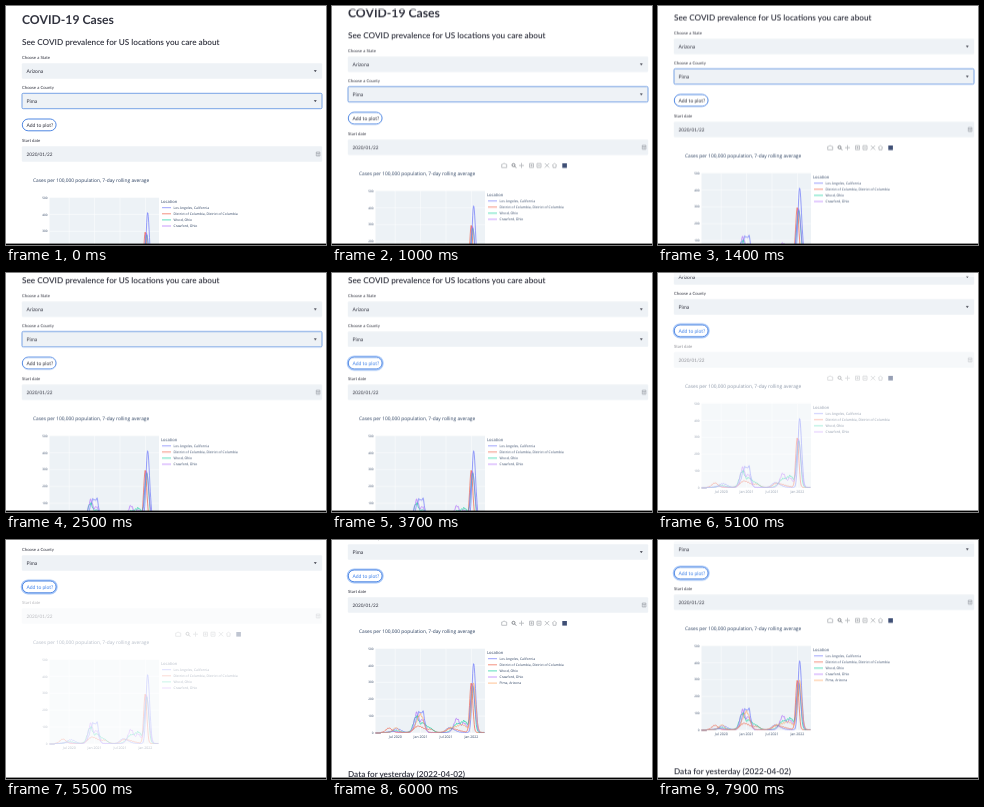
Write an HTML page that moves like this. It is 320x239 px and loops after 8000 ms.

```html
<!DOCTYPE html>
<html lang="en">
<head>
<meta charset="utf-8">
<title>COVID-19 Cases</title>
<style>
  html, body { margin: 0; width: 100%; height: 100%; overflow: hidden; background: #fff; }
  svg { display: block; width: 100vw; height: 100vh; }
  text { font-family: Lato, "Open Sans", sans-serif; fill: #31333f; text-rendering: geometricPrecision; }
  .h1 { font-size: 12.2px; font-weight: 700; }
  .h3 { font-size: 8.2px; font-weight: 600; }
  .label { font-size: 4.25px; }
  .value { font-size: 5px; }
  .field { fill: #eef2f6; }
  .chart text { font-family: "Open Sans", "Noto Sans", sans-serif; fill: #2a3f5f; }
  .grid { stroke: #fff; stroke-width: .5; }
  .series { fill: none; stroke-width: .65; stroke-linejoin: round; }

  .page, .stale, .bar, .added, .focus, .halo, .button { animation: 8s linear infinite; }
  .page { animation-name: scroll; }
  .stale { animation-name: stale; }
  .bar { animation-name: bar; }
  .added { animation-name: added; animation-timing-function: step-end; }
  .focus { animation-name: focus; }
  .halo { animation-name: halo; }
  .button { animation-name: hover; }

  @keyframes scroll {
    0%, 10% { transform: translateY(0); }
    13.75% { transform: translateY(-10px); }
    17.5% { transform: translateY(-24.5px); }
    20%, 50% { transform: translateY(-28.8px); }
    53.75% { transform: translateY(-38px); }
    58.75% { transform: translateY(-50.3px); }
    68.75% { transform: translateY(-72px); }
    72.5% { transform: translateY(-80px); }
    75% { transform: translateY(-83px); }
    81.25%, 100% { transform: translateY(-85.8px); }
  }
  @keyframes stale {
    0%, 59% { opacity: 1; }
    66%, 72.5% { opacity: .33; }
    74.5%, 100% { opacity: 1; }
  }
  @keyframes bar {
    0%, 4% { opacity: 0; }
    7.5%, 26% { opacity: 1; }
    30%, 52% { opacity: 0; }
    56%, 100% { opacity: 1; }
  }
  @keyframes added { 0% { opacity: 0; } 73.5%, 100% { opacity: 1; } }
  @keyframes focus { 0%, 43.5% { opacity: 1; } 46%, 100% { opacity: 0; } }
  @keyframes halo { 0%, 43.5% { opacity: 0; } 46%, 100% { opacity: 1; } }
  @keyframes hover { 0%, 38.5% { fill: #31333f; } 41.25%, 100% { fill: #3f82ea; } }
</style>
</head>
<body>
<svg viewBox="0 0 320 239" preserveAspectRatio="none">
  <g class="page">
    <text class="h1" x="16" y="18.3">COVID-19 Cases</text>
    <text class="h3" x="16" y="39.2">See COVID prevalence for US locations you care about</text>

    <text class="label" x="16" y="52.6">Choose a State</text>
    <rect class="field" x="15.8" y="57.2" width="300.4" height="15.6" rx="1.2"/>
    <text class="value" x="20.5" y="66.8">Arizona</text>
    <path d="M307.8 64.3h3l-1.5 1.8z" fill="#31333f"/>

    <text class="label" x="16" y="82.8">Choose a County</text>
    <rect class="field" x="15.8" y="87.2" width="300.4" height="15.6" rx="1.2"/>
    <rect class="focus" x="16" y="87.3" width="300" height="15.4" rx="1.2" fill="none" stroke="#5a8ee0" stroke-width=".8"/>
    <text class="value" x="20.5" y="96.8">Pima</text>
    <path d="M307.8 94.3h3l-1.5 1.8z" fill="#31333f"/>

    <rect class="halo" x="15.6" y="112.3" width="35.2" height="13.2" rx="6.6" fill="none" stroke="#a9c8f8" stroke-width="1.8"/>
    <rect x="16.3" y="113" width="33.8" height="11.8" rx="5.9" fill="#fff" stroke="#4f87e2"/>
    <text class="value button" x="20.4" y="120.6">Add to plot?</text>

    <g class="stale">
      <text class="label" x="16" y="135.6">Start date</text>
      <rect class="field" x="15.8" y="140.2" width="300.4" height="15.6" rx="1.2"/>
      <text x="20.5" y="149.7" font-size="4.7">2020/01/22</text>
      <path d="M310.3 146h3.6v4h-3.6zM310.3 147.3h3.6M312.1 147.3v2.7" fill="none" stroke="#7d828c" stroke-width=".45"/>

      <g class="chart" id="chart">
        <text x="27" y="175.8" font-size="4.85">Cases per 100,000 population, 7-day rolling average</text>
        <rect x="43.5" y="191.5" width="109.5" height="84.5" fill="#edf2f6"/>
        <text x="155" y="197.4" font-size="4.1">Location</text>
        <g class="bar" fill="none" stroke="#b9bbc0" stroke-width=".9">
          <path d="M169.7 165h1.2l.6-.8h1.4l.6.8h1.2v3.3h-5z"/>
          <g stroke="#777a80"><circle cx="181.5" cy="165.8" r="1.5"/><path d="M182.6 167l1.6 1.6"/></g>
          <path d="M189.5 163.7v5M187 166.2h5"/>
          <path d="M197.5 164.2h4v4h-4zM199.5 165v2.4M198.3 166.2h2.4"/>
          <path d="M205 164.2h4v4h-4zM205.8 166.2h2.4"/>
          <path d="M212.8 164l4.4 4.4M217.2 164l-4.4 4.4"/>
          <path d="M220 166.2l2.5-2 2.5 2M221 166v2.3h3V166"/>
          <rect x="230.3" y="164" width="4.6" height="4.6" fill="#3f4f75" stroke="none"/>
        </g>
      </g>
      <text class="h3" x="16" y="320.2">Data for yesterday (2022-04-02)</text>
    </g>
  </g>
  <rect width="320" height="4" fill="#fff" opacity=".5"/>
  <rect y="237.6" width="320" height="1.4" fill="#000"/>
</svg>
<script>
const chart = document.getElementById('chart');

function add(parent, tag, attrs, text = '') {
  const node = document.createElementNS('http://www.w3.org/2000/svg', tag);
  for (const [key, value] of Object.entries(attrs)) node.setAttribute(key, value);
  node.textContent = text;
  return parent.appendChild(node);
}

const yOf = cases => 276 - cases * 0.169;

for (let cases = 0; cases <= 500; cases += 100) {
  const y = yOf(cases);
  add(chart, 'path', { class: 'grid', d: `M43.5 ${y}H153` });
  add(chart, 'text', { x: 41.6, y: y + 1.1, 'font-size': 3.1, 'text-anchor': 'end' }, cases);
}
['Jul 2020', 'Jan 2021', 'Jul 2021', 'Jan 2022'].forEach((label, i) => {
  const x = 63.2 + i * 25.4;
  add(chart, 'path', { class: 'grid', d: `M${x} 191.5V276` });
  add(chart, 'text', { x, y: 280.7, 'font-size': 3.5, 'text-anchor': 'middle' }, label);
});

// Each wave: centre x, height in cases, width before and after the peak.
const places = [
  ['Los Angeles, California', '#636efa',
    [[65, 22, 4, 4], [87.6, 120, 3.5, 1.4], [90.8, 118, 1.2, 2], [117, 28, 3, 5], [141.6, 408, 1.6, 2]]],
  ['District of Columbia, District of Columbia', '#ef553b',
    [[57, 26, 3, 3], [86, 38, 4, 6], [99, 16, 3, 3], [118, 24, 3, 8], [139.2, 292, 1.5, 1.6]]],
  ['Wood, Ohio', '#00cc96',
    [[64, 10, 4, 4], [84.6, 96, 3, 2.5], [91, 52, 2, 3], [98, 25, 3, 3], [125, 50, 4, 5], [133, 52, 3, 3], [140.8, 275, 2, 1.9]]],
  ['Crawford, Ohio', '#ab63fa',
    [[62, 6, 4, 4], [84.8, 115, 2.6, 2], [90.5, 75, 2, 2.2], [125, 82, 3, 2.6], [132, 55, 2, 3], [140.4, 285, 1.8, 2.4]]],
  ['Pima, Arizona', '#ffa15a',
    [[64, 28, 3, 2.5], [88.5, 106, 4, 3.2], [118, 22, 4, 4], [130, 46, 6, 5], [141.4, 290, 2, 2.3]]]
];

function curve(waves, seed) {
  const points = [];
  for (let x = 43.5; x <= 152.5; x += 0.4) {
    const cases = waves.reduce((sum, [centre, height, before, after]) => {
      const d = (x - centre) / (x < centre ? before : after);
      return sum + height * Math.exp(-d * d / 2);
    }, x > 49 ? 3 : 0);
    const ripple = 1 + 0.07 * Math.sin(x * 2.7 + seed * 2) * (cases < 180);
    points.push(`${x.toFixed(1)} ${yOf(cases * ripple).toFixed(2)}`);
  }
  return 'M' + points.join('L');
}

places.forEach(([name, stroke, waves], i) => {
  const group = add(chart, 'g', i === 4 ? { class: 'added' } : {});
  const y = 201.7 + i * 6.1;
  add(group, 'path', { class: 'series', stroke, d: curve(waves, i) });
  add(group, 'path', { class: 'series', stroke, d: `M156 ${y}h9` });
  add(group, 'text', { x: 167.5, y: y + 1.2, 'font-size': 3.4 }, name);
});
</script>
</body>
</html>
```
